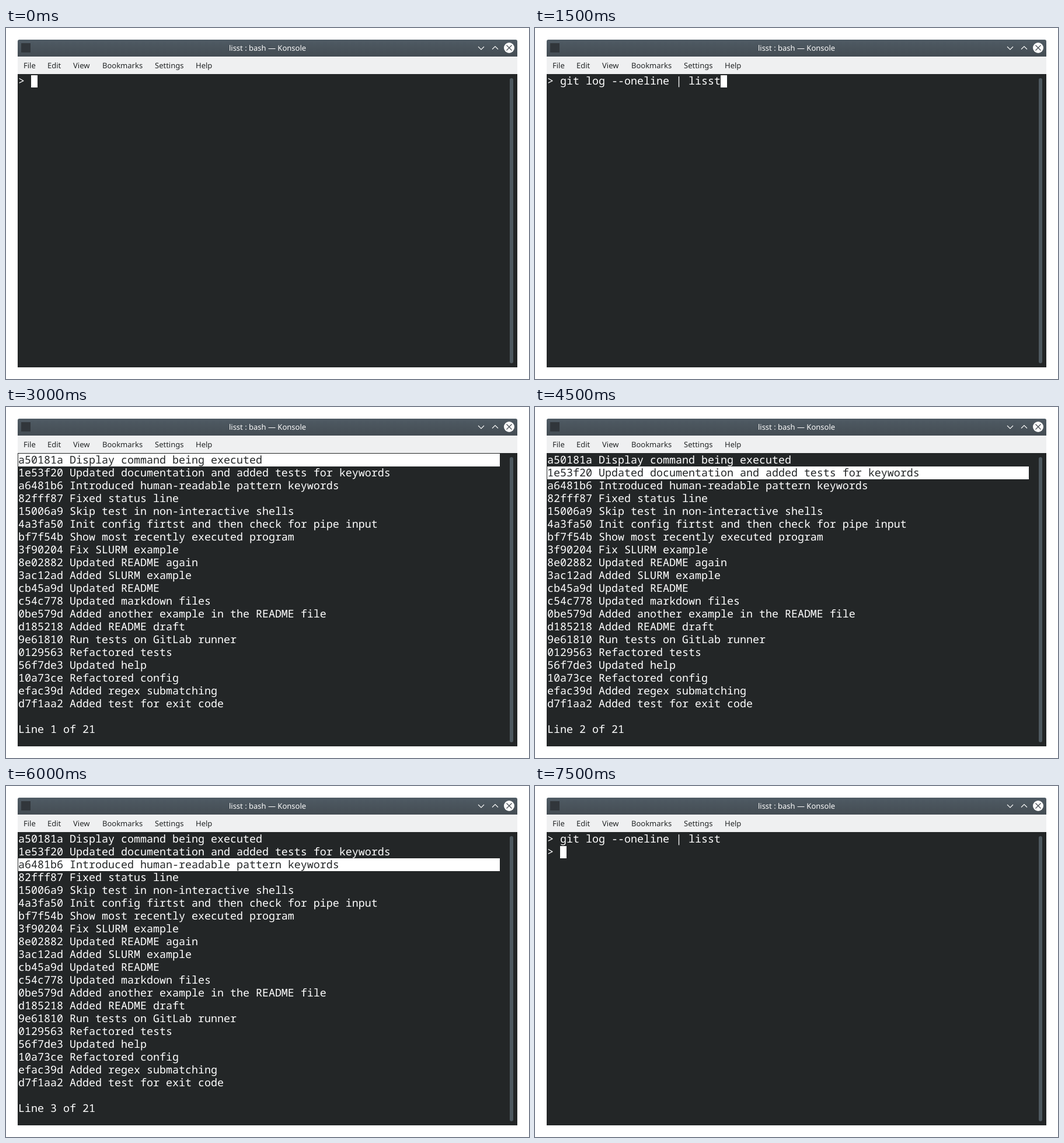
Animation, 896 px wide and 602 px high, one loop 8 s. Source, as an HTML page with a canvas:

```html
<!DOCTYPE html>
<html lang="en">
<head>
<meta charset="utf-8">
<title>Terminal list demo</title>
<style>
  html, body { margin: 0; width: 100%; height: 100%; overflow: hidden; background: #fff; }
  canvas { display: block; width: 896px; height: 602px; }
</style>
</head>
<body>
<canvas id="stage" width="896" height="602"></canvas>
<script>
const ctx = document.getElementById('stage').getContext('2d');
ctx.textRendering = 'geometricPrecision';

const LOOP = 8000, STEP = 1500;
const CELL = 11, ROW = 22, LEFT = 21, TOP = 80;
const DARK = '#232627', LIGHT = '#fcfcfc', WHITE = '#ffffff';
const UI_FONT = '13px "Noto Sans", sans-serif';
const MONO_FONT = '18.333px "Noto Sans Mono", monospace';

const COMMAND = '> git log --oneline | lisst';
const PROMPT = '> ';
const COMMITS = [
  'a50181a Display command being executed',
  '1e53f20 Updated documentation and added tests for keywords',
  'a6481b6 Introduced human-readable pattern keywords',
  '82fff87 Fixed status line',
  '15006a9 Skip test in non-interactive shells',
  '4a3fa50 Init config firtst and then check for pipe input',
  'bf7f54b Show most recently executed program',
  '3f90204 Fix SLURM example',
  '8e02882 Updated README again',
  '3ac12ad Added SLURM example',
  'cb45a9d Updated README',
  'c54c778 Updated markdown files',
  '0be579d Added another example in the README file',
  'd185218 Added README draft',
  '9e61810 Run tests on GitLab runner',
  '0129563 Refactored tests',
  '56f7de3 Updated help',
  '10a73ce Refactored config',
  'efac39d Added regex submatching',
  'd7f1aa2 Added test for exit code'
];
const MENU = [['File', 30], ['Edit', 71], ['View', 115], ['Bookmarks', 165], ['Settings', 255], ['Help', 325]];

function rect(x, y, w, h, color, radius = 0) {
  ctx.fillStyle = color;
  ctx.beginPath();
  ctx.roundRect(x, y, w, h, radius);
  ctx.fill();
}

function text(str, x, y, font, color) {
  ctx.font = font;
  ctx.fillStyle = color;
  ctx.fillText(str, x, y);
}

function stroke(points, color, width) {
  ctx.strokeStyle = color;
  ctx.lineWidth = width;
  ctx.beginPath();
  points.forEach(([x, y], i) => i ? ctx.lineTo(x, y) : ctx.moveTo(x, y));
  ctx.stroke();
}

function drawTitleBar() {
  const shade = ctx.createLinearGradient(0, 20, 0, 49);
  shade.addColorStop(0, '#4f5b64');
  shade.addColorStop(1, '#444c53');
  rect(20, 20, 856, 29, shade, [3, 3, 0, 0]);
  rect(26, 26, 16, 16, '#31363b');

  ctx.textAlign = 'center';
  text('lisst : bash — Konsole', 448, 39, UI_FONT, LIGHT);
  ctx.textAlign = 'left';

  stroke([[809, 32], [814, 37], [819, 32]], LIGHT, 1.1);
  stroke([[833, 36.5], [838, 31.5], [843, 36.5]], LIGHT, 1.1);
  rect(853, 25, 18, 18, LIGHT, 9);
  stroke([[857.5, 29.5], [866.5, 38.5]], '#4b5058', 1.2);
  stroke([[866.5, 29.5], [857.5, 38.5]], '#4b5058', 1.2);
}

function drawWindow() {
  rect(0, 0, 896, 602, WHITE);
  drawTitleBar();
  rect(20, 49, 856, 30, '#eff0f1');
  for (const [label, x] of MENU) text(label, x, 69, UI_FONT, DARK);
  rect(20, 79, 856, 503, DARK);
  rect(863, 86, 6, 489, '#4d585f', 3);
}

function line(str, row, color = WHITE) {
  text(str, LEFT, TOP + 17 + row * ROW, MONO_FONT, color);
}

function cursor(col, row) {
  rect(LEFT + col * CELL, TOP + 1 + row * ROW, CELL, ROW - 1, WHITE);
}

function drawShell(lines) {
  lines.forEach((str, row) => line(str, row));
  cursor(lines.at(-1).length, lines.length - 1);
}

function drawList(selected) {
  rect(LEFT, TOP + selected * ROW, 75 * CELL, ROW, WHITE);
  COMMITS.forEach((str, row) => line(str, row, row === selected ? DARK : WHITE));
  line(`Line ${selected + 1} of 21`, 21);
}

function draw(time) {
  const step = Math.floor((time % LOOP) / STEP);
  drawWindow();
  if (step === 0) drawShell([PROMPT]);
  else if (step === 1) drawShell([COMMAND]);
  else if (step < 5) drawList(step - 2);
  else drawShell([COMMAND, PROMPT]);
}

let start;
function tick(now) {
  start ??= now;
  draw(now - start);
  requestAnimationFrame(tick);
}
draw(0);
requestAnimationFrame(tick);
</script>
</body>
</html>
```
